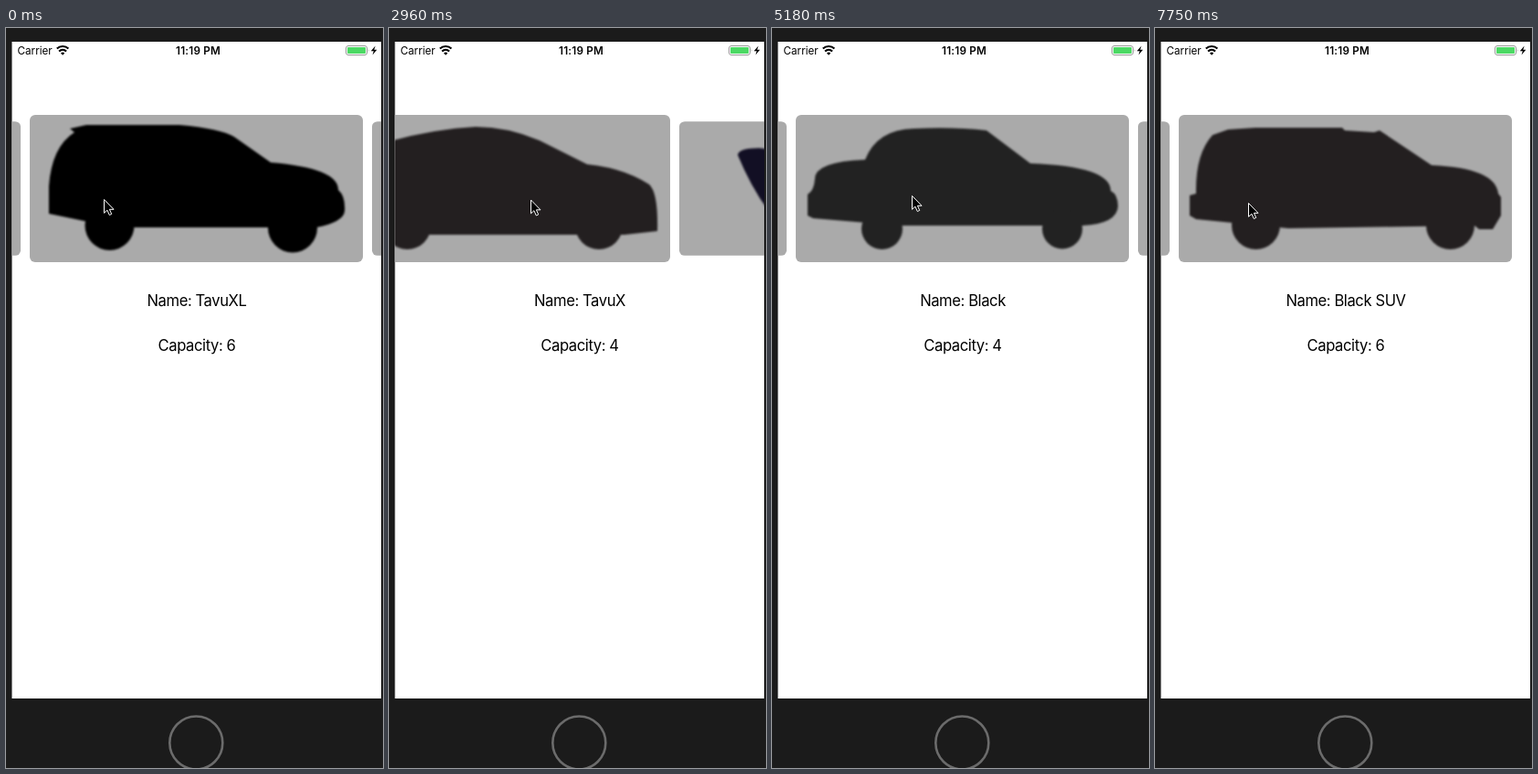
These frames come from a looping animation (413x809 px, 8 s). An HTML page:

```html
<!DOCTYPE html>
<html lang="en">
<head>
<meta charset="utf-8">
<title>Ride picker carousel</title>
<style>
  html, body { margin: 0; width: 100%; height: 100%; overflow: hidden; background: #1b1b1b; }
  svg { display: block; width: 100vw; height: 100vh; }
  text { font: 11.7px Inter, Roboto, sans-serif; fill: #000; }
  .label { font-size: 16.6px; letter-spacing: -.41px; text-anchor: middle; }
  .clock { font-weight: 600; letter-spacing: .2px; text-anchor: middle; }
  .shape { filter: blur(1.2px); }
</style>
</head>
<body>
<svg viewBox="0 0 413 809">
  <clipPath id="screen"><rect x="6.5" y="15" width="404.5" height="718"/></clipPath>
  <rect width="413" height="809" fill="#1b1b1b"/>
  <rect x="6.5" y="15" width="404.5" height="718" fill="#fff"/>
  <circle cx="208.3" cy="781.5" r="29" fill="none" stroke="#6b6b6b" stroke-width="2.6"/>

  <text x="12.5" y="29">Carrier</text>
  <g fill="none" stroke="#000" stroke-width="2.1">
    <path d="M55.8 22.6a8.9 8.9 0 0 1 12.6 0M58.1 25.5a5.8 5.8 0 0 1 8 0"/>
    <path d="M62.1 29.8l-2.1-2.3a3 3 0 0 1 4.2 0z" fill="#000" stroke="none"/>
  </g>
  <text class="clock" x="210.5" y="29">11:19 PM</text>
  <rect x="372.5" y="19.5" width="23" height="10" rx="2.5" fill="#fff" stroke="#999"/>
  <rect x="374" y="21" width="20" height="7" rx="1" fill="#4cd964"/>
  <path d="M396.8 22.8q1.4 1.7 0 3.4z" fill="#999"/>
  <path d="M404.6 19.6l-4.8 5.6h3l-1.3 4.3 4.8-5.7h-3z"/>

  <g id="cards" clip-path="url(#screen)"></g>
  <text class="label" id="name" x="209" y="304"></text>
  <text class="label" id="capacity" x="209" y="353"></text>
  <path id="cursor" d="M.5.5V15.3L3.9 12.2 6.3 17.5 8.7 16.4 6.4 11.3H11Z" stroke="#fff"/>
</svg>
<script>
const LOOP = 8000, STEPS = 54;   // the screen refreshes 54 times per loop
const PITCH = 375, MID_Y = 175.5, SIDE_SHRINK = .09;
const $ = id => document.getElementById(id);
const wheel = (x, y, r) => `<circle cx="${x}" cy="${y}" r="${r}"/>`;
const body = d => `<path d="${d}"/>`;

const rides = [
  { name: 'TavuXL', seats: 6, color: '#000', shape:
    body('M47 203V173Q50 130 75 114L70 110 88 106H190Q235 110 250 119L290 147Q364 153 364 177' +
      'Q372 184 371 200Q370 212 340 218H120Z') + wheel(113.5, 216, 27) + wheel(314, 218.5, 27) },
  { name: 'TavuX', seats: 4, color: '#231f20', shape:
    body('M52 153L53 133Q120 111 178 108Q213 108 248 123L300 149Q340 153 368 171Q378 180 377 222' +
      'L341 226H128L48 217Q37 200 46 180Q44 165 52 153Z') + wheel(103, 216, 26) + wheel(313, 216, 26) },
  { name: 'Car Seat', seats: 4, color: '#120f24', shape:
    '<ellipse cx="181.5" cy="142" rx="32" ry="13"/>' +
    body('M90 135Q92 127 113 127Q139 127 142 166L196 189Q206 194 218 191Q300 180 328 222H178' +
      'Q135 217 125 204Q105 175 90 135Z') +
    body('M165 166Q166 159 185 159L235 158Q249 159 250 164Q249 170 226 171L260 183 215 187' +
      'Q205 185 172 172Q165 169 165 166Z') },
  { name: 'Black', seats: 4, color: '#222', shape:
    body('M39 205V182Q46 178 47 165Q47 146 102 144Q115 111 155 110Q200 108 235 112L283 148' +
      'Q371 151 371 178Q379 182 379 195Q378 214 340 216H140L45 208Z') +
    wheel(120.5, 219.5, 22.5) + wheel(318, 219.5, 22) },
  { name: 'Black SUV', seats: 6, color: '#231f20', shape:
    body('M38 205V183L45 181Q44 138 63 117L80 111 110 109H205L208 112 240 114 246 112 303 150' +
      'Q373 153 376 181L379 185V205L370 220H355L350 216 146 219 45 209Z') +
    wheel(110.5, 215.5, 26.5) + wheel(323.5, 215.5, 26.5) }
];

// The pointer leaves its rest at step `start`, grabs a card at `from`, drags it
// to `to` and lets go; the carousel then coasts to the next page by `settle`.
const home = [107, 187];
const gestures = [
  { start: 1, grab: 5, release: 9, settle: 13, from: [303, 245], to: [147, 208] },
  { start: 14, grab: 18, release: 20, settle: 23, from: [238, 190], to: [155, 187.5] },
  { start: 24, grab: 31, release: 33, settle: 35, from: [208, 199], to: [153, 183] },
  { start: 41, grab: 44, release: 46, settle: 48, from: [247, 196], to: [107, 194] },
  { start: 48, grab: 50, release: 52, from: [183, 197], to: [102, 191] }
];

const progress = (t, a, b) => Math.min(1, Math.max(0, (t - a) / (b - a)));
const easeOut = u => 1 - (1 - u) ** 3;
const mix = (a, b, u) => a.map((v, i) => v + (b[i] - v) * u);

function poseAt(step) {
  let pointer = home, page = 0, focus = 0;
  gestures.forEach(({ start, grab, release, settle, from, to }, i) => {
    if (step <= start) return;
    const drag = progress(step, grab, release);
    pointer = mix(mix(pointer, from, progress(step, start, grab)), to, drag);
    if (!settle) return;
    const coast = easeOut(progress(step, release, settle));
    const pulled = drag * (from[0] - to[0]) / PITCH;
    page = i + pulled * (1 - coast) + coast;
    focus = i + coast;
  });
  return { pointer, page, focus };
}

// The leftmost card stays empty: only its right edge is ever seen.
$('cards').innerHTML = [{ shape: '' }, ...rides].map(({ shape, color }) =>
  `<g><rect x="26" y="95" width="365" height="161" rx="6" fill="#aaa"/>
   <g class="shape" fill="${color}">${shape}</g></g>`).join('');
const cards = [...$('cards').children];

function draw(now) {
  const { pointer, page, focus } = poseAt(Math.floor((now % LOOP + 6) / LOOP * STEPS));
  cards.forEach((card, i) => {
    const index = i - 1;
    const scale = 1 - SIDE_SHRINK * Math.min(1, Math.abs(index - focus));
    card.setAttribute('transform',
      `translate(${(index - page) * PITCH} ${MID_Y * (1 - scale)}) scale(1 ${scale})`);
  });
  const ride = rides[Math.floor(page)];
  $('name').textContent = 'Name: ' + ride.name;
  $('capacity').textContent = 'Capacity: ' + ride.seats;
  $('cursor').setAttribute('transform', `translate(${pointer})`);
}

const start = performance.now();
(function tick() {
  draw(performance.now() - start);
  requestAnimationFrame(tick);
})();
</script>
</body>
</html>
```
